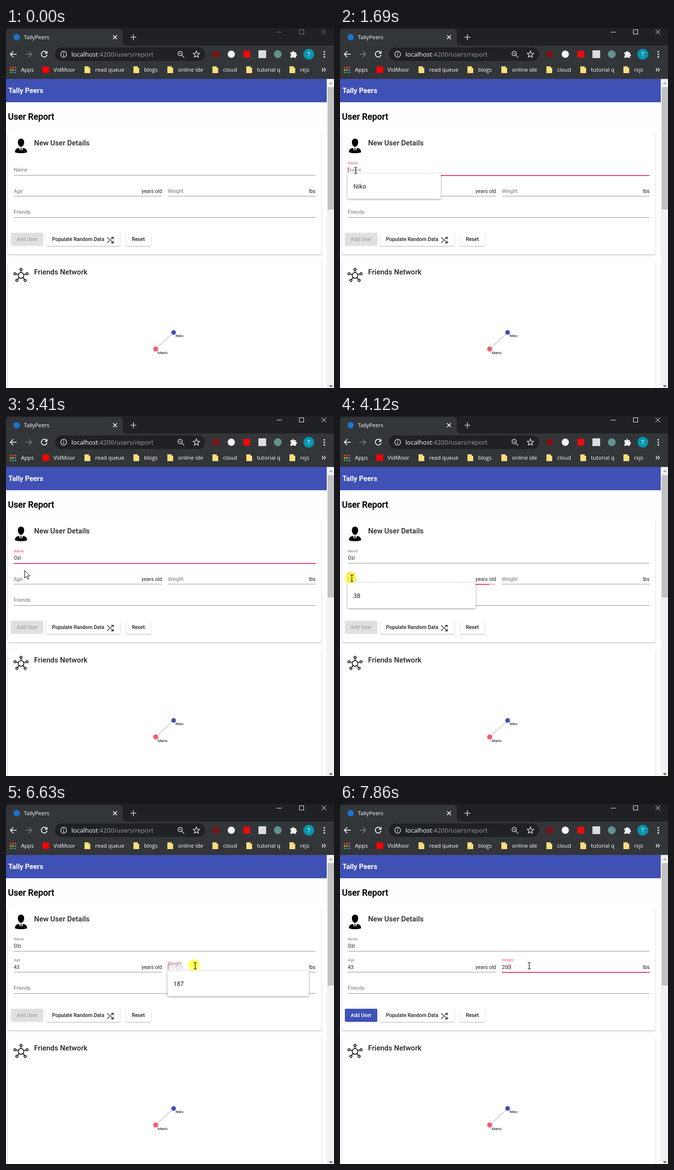
An HTML page for the animation above (8000 ms loop, 677x742 px).

```html
<!DOCTYPE html>
<html lang="en">
<head>
<meta charset="utf-8">
<title>User Report</title>
<style>
  html, body { margin: 0; width: 100%; height: 100%; overflow: hidden; background: #fefefe; }
  svg { display: block; }
  text { font: 10.5px Roboto, sans-serif; fill: #212121; white-space: pre; }
  .ui { font: 11.3px "Open Sans", sans-serif; fill: #fff; }
  .url { font: 13.1px "Open Sans", sans-serif; fill: #9aa0a6; }
  .h { font-size: 15px; font-weight: 500; }
  .b { font-weight: 500; }
  .node { font-size: 8px; fill: #000; }
  .pick { font: 12.5px "Open Sans", sans-serif; fill: #000; }
  .card { fill: #fff; filter: drop-shadow(0 1px 1px rgba(0, 0, 0, .32)); }
  .drop { fill: #fff; filter: drop-shadow(0 1px 2px rgba(0, 0, 0, .42)); }
  .line { fill: none; stroke: #fff; stroke-width: 1.6; }
</style>
</head>
<body>
<svg width="677" height="742" viewBox="0 0 677 742">
  <!-- browser frame -->
  <rect width="677" height="105" fill="#202124"/>
  <path d="M0 36V9q0-7 7-7h226q8 0 8 8v18q0 8 8 8h428v69H0z" fill="#323639"/>
  <circle cx="22" cy="19" r="6.5" fill="#1976d2"/>
  <text class="ui" x="37" y="23">TallyPeers</text>
  <path class="line" d="M221 15l8 8m0-8l-8 8"/>
  <path class="line" d="M257 19h12m-6-6v12" style="stroke:#ccc"/>
  <g id="win" fill="none" stroke-width="1">
    <path d="M559 8.5h10M605.500 3.500h9v9h-9zM651 3l10 10m0-10l-10 10"/>
  </g>
  <path class="line" d="M22 54H9m6-6l-6 6 6 6"/>
  <path class="line" d="M40 54h13m-6-6l6 6-6 6" style="stroke:#7d8185"/>
  <path class="line" d="M83.500 50a6 6 0 1 0 1.300 5"/>
  <path d="M85.500 47v6h-6z" fill="#fff"/>
  <rect x="101" y="40" width="310" height="28" rx="14" fill="#202124"/>
  <g class="line" style="stroke:#dadce0;stroke-width:1.400">
    <circle cx="119" cy="54" r="6"/><path d="M119 53v4.500m0-7.500v1.500"/>
    <circle cx="359.500" cy="52.500" r="4.500"/><path d="M363 56l5 5m-10.500-8.500h4"/>
    <path d="M393 47.500l1.900 4.400 4.700.4-3.600 3.100 1.100 4.700-4.100-2.500-4.100 2.500 1.100-4.700-3.600-3.100 4.700-.4z"/>
  </g>
  <text class="url" x="135" y="59"><tspan fill="#fff">localhost</tspan>:4200/users/report</text>
  <circle cx="433" cy="54" r="7.500" fill="#7b1517"/>
  <circle cx="465" cy="54" r="7.500" fill="#f5f5f5"/>
  <rect x="490" y="47" width="14" height="14" fill="#f00a0a"/>
  <rect x="521" y="46" width="16" height="16" fill="#dcdcdc"/>
  <circle cx="561" cy="54" r="8" fill="#62938f"/>
  <path d="M587 50h3.500a2.200 2.200 0 1 1 4.400 0h3.500v3.500a2.200 2.200 0 1 1 0 4.400v3.600h-4a2 2 0 0 0-3.900 0H587v-4a2 2 0 0 0 0-3.900z" fill="#f1f3f4"/>
  <circle cx="625" cy="54" r="11" fill="#0797b0"/>
  <text class="ui" x="625" y="58" text-anchor="middle">T</text>
  <g fill="#fff"><circle cx="657" cy="49" r="1.600"/><circle cx="657" cy="54.300" r="1.600"/><circle cx="657" cy="59.600" r="1.600"/></g>
  <g id="marks"></g>
  <rect x="75" y="79.500" width="14" height="13" fill="#f00"/>
  <path class="line" d="M652 82.500l3 3.500-3 3.500m4.500-7l3 3.500-3 3.500" style="stroke-width:1.300"/>

  <!-- page -->
  <rect y="105" width="662" height="48" fill="#3f51b5"/>
  <text class="h" x="5" y="134" style="fill:#fff;font-weight:700;font-size:14.500px">Tally Peers</text>
  <text x="4" y="189" style="font-size:18px;font-weight:500;fill:#000;stroke:#000;stroke-width:.3">User Report</text>
  <rect class="card" x="4" y="214" width="647" height="252.500" rx="3"/>
  <rect class="card" x="4" y="480" width="647" height="300" rx="3"/>
  <rect y="205" width="662" height="11" fill="#fefefe"/>
  <g>
    <path d="M31 228c4 0 6.500 3 6.500 7.500S34.500 245 31 245s-6.500-5-6.500-9.500S27 228 31 228zM18.500 256c0-6 3-7.500 8-9l4.500 9 4.500-9c5 1.500 8 3 8 9-5 2.700-20 2.700-25 0z"/>
    <path d="M29.500 247h3l-.8 2.500.9 4-1.600 3-1.600-3 .9-4z"/>
  </g>
  <text class="h" x="58" y="242">New User Details</text>
  <g id="net" fill="none" stroke="#000" stroke-width="1.500"></g>
  <text class="h" x="58" y="508">Friends Network</text>

  <g id="fields"></g>
  <text x="322" y="340" text-anchor="end">years old</text>
  <text x="639" y="340" text-anchor="end">lbs</text>

  <rect id="add" x="10" y="422" width="67" height="27" rx="2.500"/>
  <text id="addText" class="b" x="43.500" y="439" text-anchor="middle">Add User</text>
  <rect class="card" x="83" y="422" width="153" height="27" rx="2.500"/>
  <text class="b" x="95" y="439">Populate Random Data</text>
  <path d="M209 431.500l12 11m-12 0l4.500-4.200m3-2.800l4.500-4m-4 0h4.500v4m0 3v4.500h-4.500" fill="none" stroke="#212121" stroke-width="1.300"/>
  <rect class="card" x="248" y="422" width="51" height="27" rx="2.500"/>
  <text class="b" x="273" y="439" text-anchor="middle">Reset</text>

  <path d="M309 661.500L346 627.500" stroke="#c2c2c2" stroke-width="1.200"/>
  <circle cx="346" cy="627.500" r="4.800" fill="#3f51b5"/>
  <circle cx="309" cy="661.500" r="5.200" fill="#f65c72"/>
  <text class="node" x="350" y="637">Niko</text>
  <text class="node" x="313" y="672">Marlo</text>

  <rect x="662" y="105" width="15" height="637" fill="#f1f1f1"/>
  <rect x="664" y="122" width="13" height="252" fill="#c1c1c1"/>
  <path d="M666.500 115.500l4-4 4 4z" fill="#a3a3a3"/>
  <path d="M666.500 736.500l4 4 4-4z" fill="#505050"/>

  <g id="drops"></g>
  <circle id="press" r="12" fill="#ff0" opacity=".62"/>
  <path id="arrow" d="M.5.5v15.500l3.600-3.400 2.500 5.600 2.400-1-2.400-5.500h4.900z" fill="#fff" stroke="#000" stroke-width="1"/>
  <path id="beam" d="M-3-6.500h2l1 1 1-1h2M0-5.500v11M-3 6.500h2l1-1 1 1h2" fill="none" stroke="#000" stroke-width="1.100"/>
</svg>
<script>
const LOOP = 8000;
const $ = id => document.getElementById(id);
const clamp = v => Math.min(1, Math.max(0, v));
const mix = (a, b, k) => a + (b - a) * k;
const blend = (a, b, k) => `rgb(${a.map((v, i) => Math.round(mix(v, b[i], k)))})`;
const show = (el, on) => el.style.display = on ? '' : 'none';

function make(parent, tag, attrs, text = '') {
  const el = document.createElementNS('http://www.w3.org/2000/svg', tag);
  for (const key in attrs) el.setAttribute(key, attrs[key]);
  el.textContent = text;
  return parent.appendChild(el);
}

// cubic-bezier(.25, .8, .25, 1)
function ease(x) {
  x = clamp(x);
  let lo = 0, hi = 1;
  for (let i = 0; i < 20; i++) {
    const s = (lo + hi) / 2;
    if (.75 * s * (1 - s) + s ** 3 < x) lo = s; else hi = s;
  }
  const s = hi, r = 1 - s;
  return 2.4 * r * r * s + 3 * r * s * s + s ** 3;
}

const GREY = [117, 117, 117], PINK = [255, 64, 129];

const fields = [
  { name: 'Name', x: 16, end: 639, y: 303, from: 1420, to: 4020, value: 'Ozi', keys: [2390, 2550, 2890], pick: 'Niko', pickEnd: 208 },
  { name: 'Age', x: 16, end: 321.5, y: 346.5, from: 4020, to: 6570, value: '43', keys: [4970, 5130], pick: '38', pickEnd: 280 },
  { name: 'Weight', x: 334, end: 639, y: 346.5, from: 6570, to: LOOP, value: '200', keys: [7420, 7580, 7740], pick: '187', pickEnd: 625 },
  { name: 'Friends', x: 16, end: 639, y: 390, from: Infinity, to: Infinity, value: '', keys: [] }
];

// time, x, y
const moves = [
  [70, 609, 723], [250, 420, 560], [450, 180, 365], [660, 69, 279], [800, 69, 279],
  [1050, 37, 293], [1140, 37, 293], [1210, 32, 293], [3200, 32, 293], [3410, 38, 318],
  [3510, 39, 320], [3620, 39, 320], [3930, 24, 334], [5620, 24, 334], [5850, 150, 356],
  [6080, 350, 364], [6220, 425, 358], [6420, 394, 335], [6480, 394, 335], [6540, 390, 332.5]
];
const presses = [[1210, 1480], [3980, 4190], [6540, 6720]];
const hidden = [[0, 70], [2390, 3240], [4970, 5650], [7420, 7850]];
const within = (spans, t) => spans.some(([a, b]) => t >= a && t < b);

for (const [x, label] of [[162, 'read queue'], [263, 'blogs'], [333, 'online ide'], [426, 'cloud'], [496, 'tutorial q'], [585, 'rxjs']]) {
  make($('marks'), 'path', { d: `M${x} 79h9v3h3v11h-12z`, fill: '#fbdd7c' });
  make($('marks'), 'text', { class: 'ui', x: x + 22, y: 90 }, label);
}
make($('marks'), 'text', { class: 'ui', x: 31, y: 90 }, 'Apps');
make($('marks'), 'text', { class: 'ui', x: 98, y: 90 }, 'VidMoor');
['#ea4335', '#fbbc05', '#34a853'].forEach((fill, row) => {
  for (let i = 0; i < 3; i++)
    make($('marks'), 'rect', { x: 8 + i * 5, y: 80 + row * 5, width: 3, height: 3, fill: i === 2 && row ? '#4285f4' : fill });
});

make($('net'), 'circle', { cx: 31, cy: 510, r: 5.8 });
for (const [x, y] of [[31, 497.5], [18.5, 506.5], [43.5, 506.5], [22.5, 520], [39.5, 520]]) {
  const dx = x - 31, dy = y - 510, d = Math.hypot(dx, dy);
  make($('net'), 'circle', { cx: x, cy: y, r: 2.2 });
  make($('net'), 'path', { d: `M${31 + dx / d * 6} ${510 + dy / d * 6}L${x - dx / d * 2.2} ${y - dy / d * 2.2}` });
}

for (const f of fields) {
  const g = $('fields'), base = f.y - 7;
  make(g, 'rect', { x: f.x, y: Math.floor(f.y), width: f.end - f.x, height: 1, fill: '#949494' });
  f.bar = make(g, 'rect', { y: Math.floor(f.y), height: 2, fill: '#e8407f' });
  f.hint = make(g, 'text', { x: f.x, y: base }, f.name);
  f.label = make(g, 'text', {}, f.name);
  f.text = make(g, 'text', { x: f.x, y: base });
  f.caret = make(g, 'rect', { y: f.y - 17, width: 1, height: 13, fill: '#c2386c' });
  f.drop = make($('drops'), 'g', {});
  if (f.pick) {
    const top = Math.floor(f.y) - 2 - (f.name === 'Name');
    make(f.drop, 'rect', { class: 'drop', x: f.x - .5, y: top, width: f.pickEnd - f.x + .5, height: 52, rx: 2.5 });
    make(f.drop, 'text', { class: 'pick', x: f.x + 11.5, y: top + 31 }, f.pick);
  }
}

function drawField(f, t) {
  const focused = t >= f.from && t < f.to;
  const typed = f.keys.filter(k => t >= k).length;
  const age = Math.max(0, t - f.from) || 0;
  const k = t < f.from ? 0 : ease(age / 400);

  f.label.setAttribute('transform', `translate(${f.x} ${f.y - 7 - 15.5 * k}) scale(${1 - .25 * k})`);
  f.label.style.fill = focused ? blend(GREY, PINK, k) : blend(GREY, GREY, 0);

  f.text.textContent = f.value.slice(0, typed);
  show(f.hint, focused && !typed);
  f.hint.style.fill = `rgba(0,0,0,${.42 * k})`;

  const half = (f.end - f.x) / 2 * mix(.5, 1, ease(age / 300));
  show(f.bar, focused);
  f.bar.setAttribute('x', (f.x + f.end) / 2 - half);
  f.bar.setAttribute('width', half * 2);
  f.bar.setAttribute('opacity', clamp(age / 100));

  const last = typed ? f.keys[typed - 1] : f.from;
  show(f.caret, focused && (t - last) % 1000 < 500);
  if (focused) f.caret.setAttribute('x', f.x + (typed ? f.text.getComputedTextLength() : 0));
  show(f.drop, focused && !typed);
}

function pointer(t) {
  const i = moves.findIndex(m => m[0] > t);
  if (i === 0) return moves[0].slice(1);
  if (i < 0) return moves[moves.length - 1].slice(1);
  const [a, b] = [moves[i - 1], moves[i]], k = (t - a[0]) / (b[0] - a[0]);
  return [mix(a[1], b[1], k), mix(a[2], b[2], k)];
}

function render(t) {
  fields.forEach(f => drawField(f, t));
  $('win').setAttribute('stroke', t < 1290 ? '#85878a' : '#fff');

  const on = t < 7420 ? 0 : ease((t - 7420) / 400);
  $('add').setAttribute('fill', blend([224, 224, 224], [63, 81, 181], on));
  $('addText').style.fill = blend([166, 166, 166], [255, 255, 255], on);

  const [x, y] = pointer(t);
  const overInput = fields.some(f => x > f.x && x < f.end && y > f.y - 20 && y < f.y - 1);
  const visible = !within(hidden, t);
  show($('arrow'), visible && !overInput);
  show($('beam'), visible && overInput);
  show($('press'), within(presses, t));
  $('arrow').setAttribute('transform', `translate(${Math.round(x)} ${Math.round(y)})`);
  $('beam').setAttribute('transform', `translate(${Math.round(x) + .5} ${Math.round(y) + .5})`);
  $('press').setAttribute('transform', `translate(${x - 2} ${y - 1})`);
}

const start = performance.now();
function tick() {
  render((performance.now() - start) % LOOP);
  requestAnimationFrame(tick);
}
tick();
</script>
</body>
</html>
```
